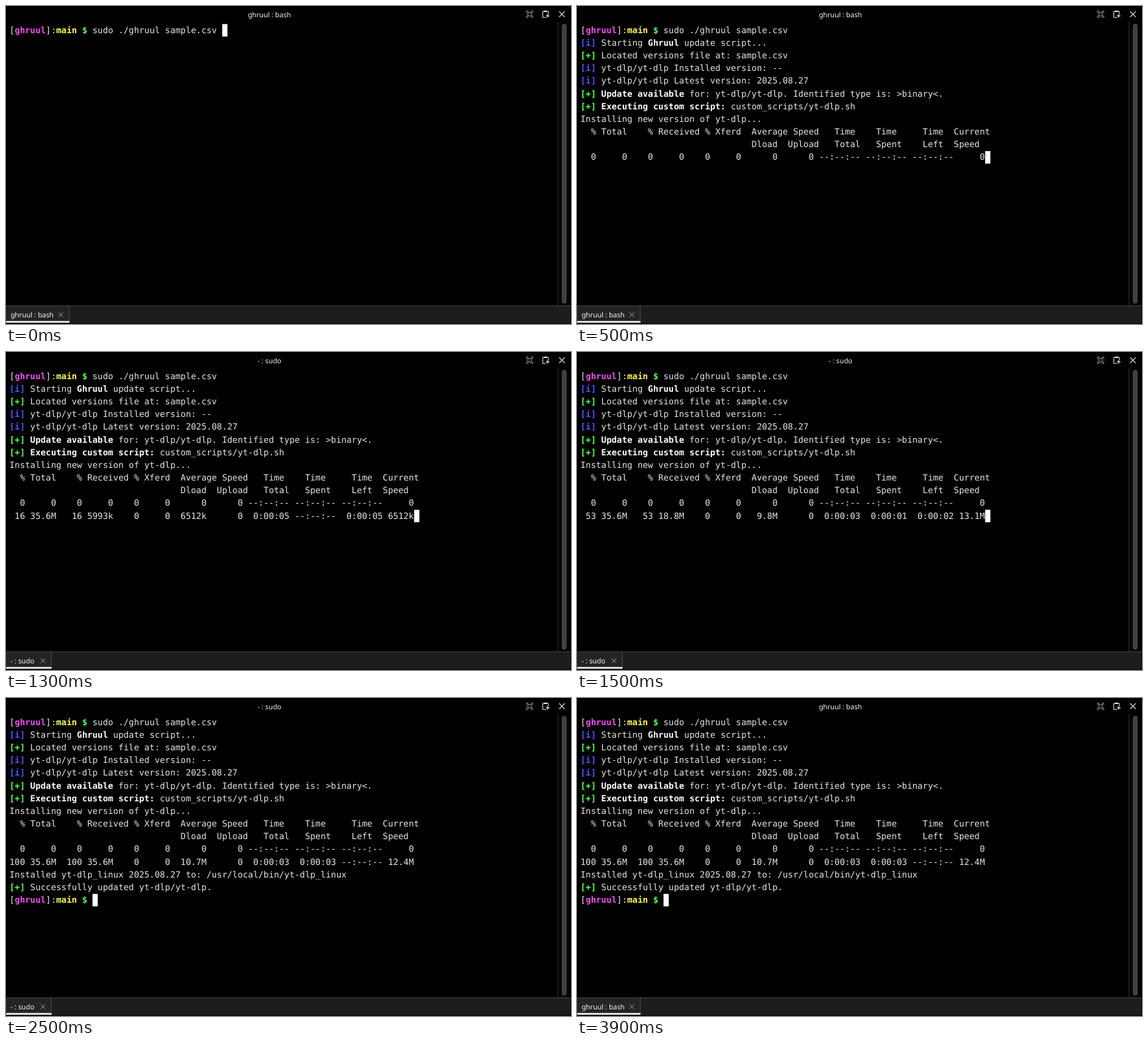
Recreate the animation shown at these times as an HTML page. Size 853 by 480 pixels, loop 4.5 s.

```html
<!DOCTYPE html>
<html lang="en">
<head>
<meta charset="utf-8">
<title>Terminal update run</title>
<style>
  html, body { margin: 0; width: 100%; height: 100%; overflow: hidden; background: #000; }
  svg { display: block; width: 100vw; height: 100vh; }
  text { white-space: pre; text-rendering: geometricPrecision; }
  .ui { font: 10.5px "Noto Sans", "Open Sans", sans-serif; fill: #f6f6f6; }
  .term { font: 13.01px "DejaVu Sans Mono", monospace; fill: #e6e6e6; }
  .bold { font-weight: 700; fill: #fff; }
  .blue { font-weight: 700; fill: #5454ff; }
  .green { font-weight: 700; fill: #54ff54; }
  .pink { font-weight: 700; fill: #f050f0; }
  .yellow { font-weight: 700; fill: #ffff54; }
  .icon { fill: none; stroke: #ececec; stroke-width: 1; }
  .dim { stroke: #a4a4a4; }
</style>
</head>
<body>
<svg viewBox="0 0 853 480">
  <rect width="853" height="480"/>
  <text id="title" class="ui" x="397.7" y="16.5" text-anchor="middle"></text>

  <g class="icon dim">
    <path d="M785.8 10.5v-2.8h2.8M792.4 7.7h2.8v2.8M795.2 14.4v2.8h-2.8M788.6 17.2h-2.8v-2.8"/>
    <rect x="787.9" y="9.8" width="5.2" height="5.2"/>
  </g>
  <g class="icon">
    <path d="M815.5 17.3h-5.1V8h8.4v4.6"/>
    <path d="M812.3 8h4.6" stroke-width="2"/>
    <path d="M817.8 12.2v5.4M815.1 14.9h5.4" stroke-width="1.2"/>
    <path d="M835.1 8.2l8.4 8.4m0-8.4l-8.4 8.4" stroke-width="1.2"/>
  </g>

  <path d="M833.5 24V452" stroke="#303030"/>
  <rect x="839.6" y="27.3" width="6.4" height="421.6" rx="3.2" fill="#404040" stroke="#4b4b4b" stroke-width=".8"/>

  <rect y="452.5" width="852" height="26.5" fill="#1d1d1e"/>
  <path d="M0 452.5H852" stroke="#424243"/>
  <rect id="tab" y="453" height="24.5" fill="#242425"/>
  <path id="tabSide" stroke="#484849"/>
  <rect id="tabLine" y="475.6" height="2.4" rx="1.2" fill="#f4f4f4"/>
  <text id="tabText" class="ui" x="6.9" y="470.2"></text>
  <path id="tabClose" class="icon dim" d="M-3.4 -3.4l6.8 6.8m0 -6.8l-6.8 6.8"/>

  <g id="screen" class="term"></g>
  <rect id="cursor" width="7.9" height="18.8" fill="#fff"/>
</svg>
<script>
const LOOP = 4500, STEP = 500;
const LEFT = 5.3, TOP = 27.3, COL = 7.832, ROW = 19.17, BASELINE = 13.4;
const $ = id => document.getElementById(id);

// A line is a list of pieces: plain strings or [class, string].
const info = ["blue", "[i]"], done = ["green", "[+]"];
const prompt = ["[", ["pink", "ghruul"], "]:", ["yellow", "main"], " ", ["green", "$"], " "];
const command = [...prompt, "sudo ./ghruul sample.csv "];

const intro = [
  command,
  [info, " Starting ", ["bold", "Ghruul"], " update script..."],
  [done, " Located versions file at: sample.csv"],
  [info, " yt-dlp/yt-dlp Installed version: --"],
  [info, " yt-dlp/yt-dlp Latest version: 2025.08.27"],
  [done, " ", ["bold", "Update available"], " for: yt-dlp/yt-dlp. Identified type is: >binary<."],
  [done, " ", ["bold", "Executing custom script:"], " custom_scripts/yt-dlp.sh"],
  ["Installing new version of yt-dlp..."],
  ["  % Total    % Received % Xferd  Average Speed   Time    Time     Time  Current"],
  [" ".repeat(33) + "Dload  Upload   Total   Spent    Left  Speed"]
];

const NONE = "--:--:--";
const meter = (pct, total, got, rate, all, spent, left, now) => [
  [pct, 3], [total, 6], [pct, 5], [got, 6], [0, 5], [0, 6], [rate, 7], [0, 7],
  [all, 9], [spent, 9], [left, 9], [now, 6]
].map(([value, width]) => String(value).padStart(width)).join("");

const start = [...intro, [meter(0, 0, 0, 0, NONE, NONE, NONE, 0)]];
const progress = (pct, ...rest) => [...start, [meter(pct, "35.6M", ...rest)]];
const finished = [
  ...progress(100, "35.6M", "10.7M", "0:00:03", "0:00:03", NONE, "12.4M"),
  ["Installed yt-dlp_linux 2025.08.27 to: /usr/local/bin/yt-dlp_linux"],
  [done, " Successfully updated yt-dlp/yt-dlp."],
  prompt
];

const bash = { name: "ghruul : bash", width: 96, close: 82.8 };
const sudo = { name: "- : sudo", width: 69, close: 55.8 };
const scenes = [
  { tab: bash, lines: [command] },
  { tab: bash, lines: start },
  { tab: sudo, lines: progress(16, "5993k", "6512k", "0:00:05", NONE, "0:00:05", "6512k") },
  { tab: sudo, lines: progress(53, "18.8M", "9.8M", "0:00:03", "0:00:01", "0:00:02", "13.1M") },
  { tab: sudo, lines: progress(86, "30.9M", "10.6M", "0:00:03", "0:00:02", "0:00:01", "12.5M") },
  { tab: sudo, lines: finished },
  { tab: bash, lines: finished }
];

const escape = s => s.replace(/</g, "&lt;").replace(/>/g, "&gt;");
const span = piece => typeof piece === "string"
  ? escape(piece)
  : `<tspan class="${piece[0]}">${escape(piece[1])}</tspan>`;
const lineText = (line, row) =>
  `<text x="${LEFT}" y="${TOP + row * ROW + BASELINE}">${line.map(span).join("")}</text>`;
const lineLength = line =>
  line.reduce((n, piece) => n + (typeof piece === "string" ? piece : piece[1]).length, 0);

function set(id, attrs) {
  for (const key in attrs) $(id).setAttribute(key, attrs[key]);
}

function draw({ tab, lines }) {
  const row = lines.length - 1;
  $("screen").innerHTML = lines.map(lineText).join("");
  set("cursor", { x: LEFT + lineLength(lines[row]) * COL, y: TOP + row * ROW });
  $("title").textContent = $("tabText").textContent = tab.name;
  set("tab", { width: tab.width });
  set("tabLine", { width: tab.width });
  set("tabSide", { d: `M${tab.width - 0.5} 453V477` });
  set("tabClose", { transform: `translate(${tab.close} 466)` });
}

let shown = -1;
const origin = performance.now();
function tick() {
  const time = (performance.now() - origin) % LOOP;
  const index = Math.min(Math.floor(time / STEP), scenes.length - 1);
  if (index !== shown) draw(scenes[shown = index]);
  requestAnimationFrame(tick);
}
tick();
</script>
</body>
</html>
```
